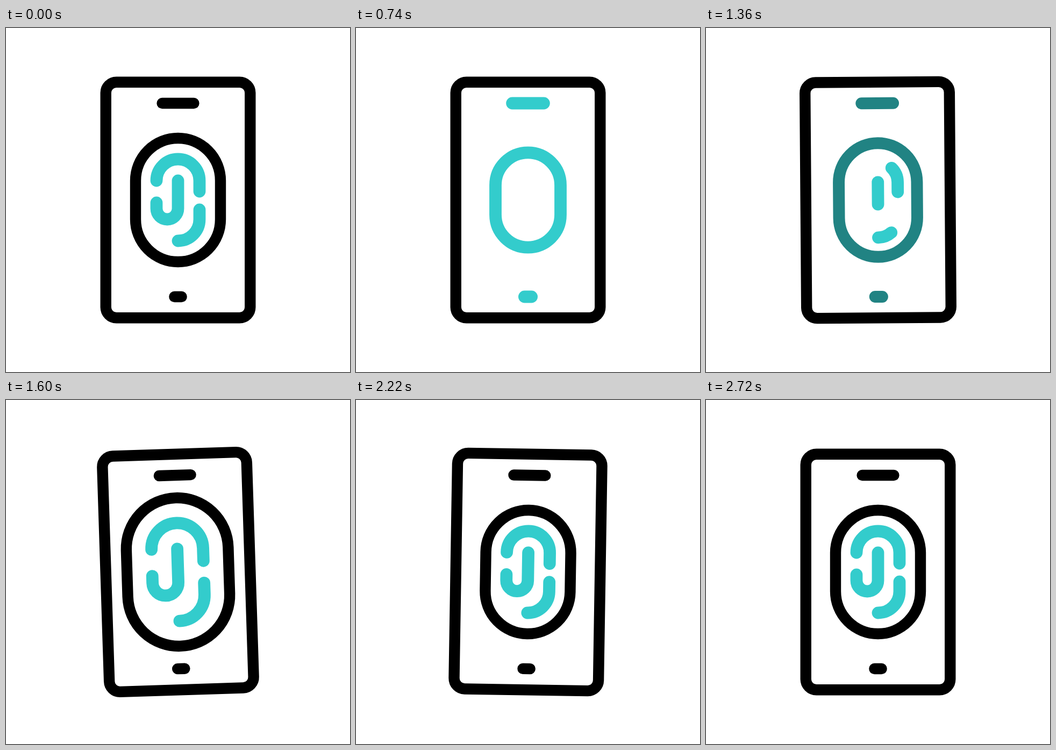
These frames come from a looping animation (640 by 640 pixels, 2800 ms). An HTML page with a canvas:

```html
<!DOCTYPE html>
<html>
<head>
<meta charset="utf-8">
<title>Phone fingerprint</title>
<style>
  html, body { margin: 0; height: 100%; overflow: hidden; background: #fff; }
  canvas { display: block; }
</style>
</head>
<body>
<canvas id="stage" width="640" height="640"></canvas>
<script>
const ctx = document.getElementById('stage').getContext('2d');
const LOOP = 2800, TEAL = [51, 204, 204];
const THIN = 20.4, THICK = 22.8;

// Swing of the phone: [time, degrees]
const SWING = [[928, 0], [1211, 5], [1495, -5], [1778, 5], [2062, -5], [2345, 5], [2720, 0]];

// Fingerprint ridges around the centre; each one shrinks towards its first point
const RIDGES = [
  { length: 146, path: [[40, -16], [40, -36], [0, -36, 40, 0, Math.PI, true]] },
  { length: 126, path: [[0, -36], [0, 16], [-20, 16, 20, 0, Math.PI, false], [-40, 5]] },
  { length: 81, path: [[0, 76], [0, 36, 40, Math.PI / 2, 0, true], [40, 18]] }
];

// Smooth 0..1 ramp between two times
function ease(t, from, to) {
  const s = Math.min(1, Math.max(0, (t - from) / (to - from)));
  return s * s * (3 - 2 * s);
}

function swingAngle(t) {
  let angle = 0;
  for (let i = 1; i < SWING.length; i++) {
    const [t0, a0] = SWING[i - 1], [t1, a1] = SWING[i];
    angle += (a1 - a0) * ease(t, t0, t1);
  }
  return angle * Math.PI / 180;
}

function stroke(color, width) {
  ctx.strokeStyle = color;
  ctx.lineWidth = width;
  ctx.stroke();
}

function pill(y, halfLength, color, width) {
  ctx.beginPath();
  ctx.moveTo(-halfLength, y);
  ctx.lineTo(halfLength, y);
  stroke(color, width);
}

function ridge({ length, path }, scale, visible) {
  ctx.beginPath();
  for (const [x, y, r, ...arc] of path) {
    if (r) ctx.arc(x * scale, y * scale, r * scale, ...arc);
    else ctx.lineTo(x * scale, y * scale);
  }
  ctx.setLineDash(visible < 1 ? [length * visible * scale, 999] : []);
  stroke(`rgb(${TEAL})`, THICK);
  ctx.setLineDash([]);
}

function draw(t) {
  const shrink = ease(t, 0, 400), grow = ease(t, 1200, 1600);
  const scale = 1 - 0.234 * shrink + 0.434 * grow - 0.2 * ease(t, 1600, 1900);
  const tint = shrink - grow;
  const visible = 1 - ease(t, 335, 740) + grow;
  const color = `rgb(${TEAL.map(v => Math.round(v * tint))})`;
  const width = THIN + (THICK - THIN) * tint;

  ctx.setTransform(1, 0, 0, 1, 0, 0);
  ctx.fillStyle = '#fff';
  ctx.fillRect(0, 0, 640, 640);
  ctx.translate(320, 320);
  ctx.rotate(swingAngle(t));
  ctx.lineCap = 'round';

  ctx.beginPath();
  ctx.roundRect(-134.3, -219.3, 268.6, 438.6, 19.8);
  stroke('#000', THIN);

  pill(-180, 29.4, color, width);
  pill(180, 6.6, color, width);

  ctx.beginPath();
  ctx.roundRect(-79 * scale, -115 * scale, 158 * scale, 230 * scale, 79 * scale);
  stroke(color, width);

  if (visible > 0.001) RIDGES.forEach(r => ridge(r, scale, visible));
}

const start = performance.now();
function tick() {
  draw((performance.now() - start) % LOOP);
  requestAnimationFrame(tick);
}
tick();
</script>
</body>
</html>
```
